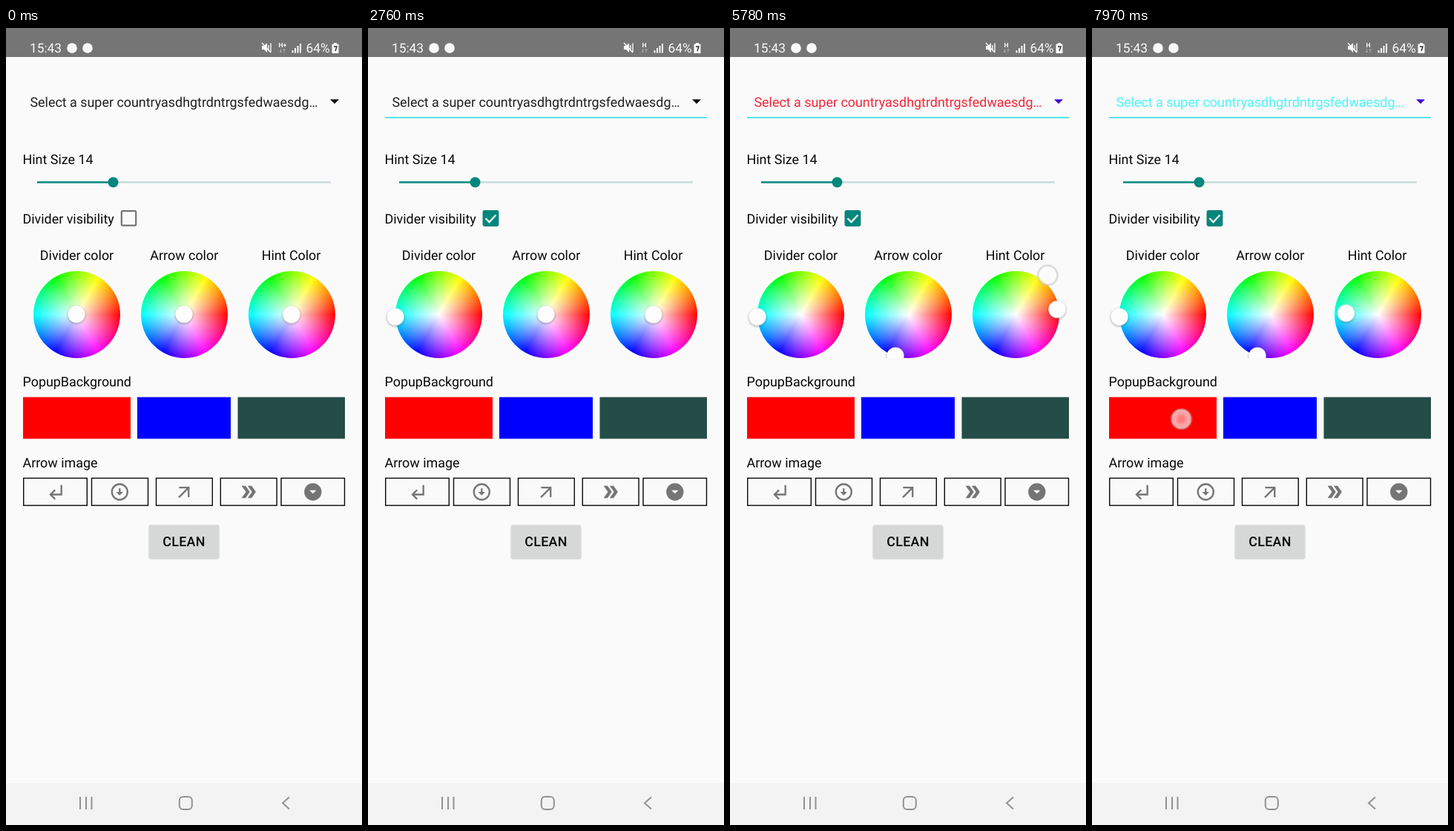
An HTML page for the animation above (8000 ms loop, 480 by 1072 pixels).

```html
<!DOCTYPE html>
<html lang="en">
<head>
<meta charset="utf-8">
<title>Spinner settings demo</title>
<style>
  :root { --bg: #fafafa; --grey: #757575; --teal: #01877c; }
  html, body { margin: 0; width: 100%; height: 100%; overflow: hidden; background: var(--bg); }
  #stage { position: absolute; left: 0; top: 0; width: 480px; height: 1072px; overflow: hidden; background: var(--bg); }
  svg { position: absolute; left: 0; top: 0; }
  .wheel {
    position: absolute; top: 326.5px; width: 117px; height: 117px; border-radius: 50%;
    background:
      radial-gradient(circle closest-side, #fff, rgba(255, 255, 255, 0)),
      conic-gradient(from 90deg, red, magenta, blue, cyan, lime, yellow, red);
  }
  text { font: 17.9px Roboto, sans-serif; fill: #080808; text-rendering: geometricPrecision; }
  .mid { text-anchor: middle; }
  .status text { font-size: 17.3px; fill: var(--bg); }
  .status .tiny { font-size: 8.5px; font-weight: 700; }
  .item { font-size: 20.1px; }
  .button { font-weight: 500; letter-spacing: .3px; }
  .frame rect { fill: none; stroke: #080808; stroke-width: 1.4; }
  .icon { fill: var(--grey); }
  .nav { fill: none; stroke: #929292; stroke-width: 2; }
  .knob { fill: #fdfdfd; filter: drop-shadow(0 1.5px 1.5px rgba(60, 60, 60, .5)); }
  .teal { fill: var(--teal); }

  .anim { animation: 8s linear infinite; }
  #hPlus { animation-name: hPlus; }
  #hOnly { animation-name: hOnly; }
  #checked { animation-name: check; transform-box: fill-box; transform-origin: center; }
  #ripple { animation-name: ripple; transform-box: fill-box; transform-origin: center; }
  #divider { animation-name: divider; }
  #arrow { animation-name: arrow; }
  #hint { animation-name: hint; }
  #knobD { animation-name: knobD; }
  #knobA { animation-name: knobA; }
  #knobH { animation-name: knobH; }
  #popup { animation-name: popup; }
  #touch { animation-name: touchMove, touchShow; }

  @keyframes hPlus { 0%, 8.8% { opacity: 1 } 8.81%, 100% { opacity: 0 } }
  @keyframes hOnly { 0%, 8.8% { opacity: 0 } 8.81%, 100% { opacity: 1 } }
  @keyframes check {
    0%, 6.4% { opacity: 0; transform: scale(.8) }
    8.6%, 100% { opacity: 1; transform: none }
  }
  @keyframes ripple {
    0%, 4.7% { opacity: 0; transform: scale(.4) }
    7% { opacity: .16; transform: none }
    12.6%, 100% { opacity: 0; transform: none }
  }
  @keyframes divider {
    0%, 6.6% { stroke: #8c8c8c; stroke-width: 1px; opacity: 0 }
    6.61%, 20.5% { stroke: #8c8c8c; stroke-width: 1px; opacity: 1 }
    20.6% { stroke: #e6ffff; stroke-width: 1.6px }
    24.5% { stroke: #84f2f6 }
    29%, 100% { stroke: #18e0ea; stroke-width: 1.6px; opacity: 1 }
  }
  @keyframes arrow {
    0%, 38.9% { fill: #080808 }
    39% { fill: #f0e6ff }
    44% { fill: #946cf6 }
    50.5%, 100% { fill: #4203d8 }
  }
  @keyframes hint {
    0%, 61.3% { fill: #202020 }
    61.4% { fill: #ffe4e0 }
    65.5% { fill: #f88c88 }
    69.8%, 72.3% { fill: #f22638 }
    74% { fill: #f4c42c }
    76% { fill: #a4fa50 }
    79.6%, 100% { fill: #4cf4fa }
  }
  @keyframes knobD {
    0%, 20.5% { transform: translate(95px, 385px) }
    24.5% { transform: translate(70px, 386px) }
    29%, 100% { transform: translate(37px, 388.5px) }
  }
  @keyframes knobA {
    0%, 39% { transform: translate(240px, 385px) }
    45% { transform: translate(234px, 411px) }
    50.5%, 100% { transform: translate(223px, 441px) }
  }
  @keyframes knobH {
    0%, 61.3% { transform: translate(384.7px, 385.5px) }
    61.4% { transform: translate(386px, 380px) }
    69.8%, 72.3% { transform: translate(441px, 378.5px) }
    73.6% { transform: translate(425px, 344px) }
    76.2% { transform: translate(385px, 338px) }
    79.6%, 100% { transform: translate(342.5px, 383.5px) }
  }
  @keyframes popup {
    0%, 84.4% { opacity: 0; clip-path: inset(0 0 85% 0) }
    88%, 92% { opacity: 1; clip-path: inset(0) }
    95.5%, 100% { opacity: 0; clip-path: inset(0) }
  }
  @keyframes touchMove {
    0%, 12% { transform: translate(165px, 256px) }
    12.1%, 20% { transform: translate(95px, 385px) }
    23.8% { transform: translate(68px, 386px) }
    28.5%, 35% { transform: translate(34px, 389px) }
    35.1%, 38.4% { transform: translate(240px, 386px) }
    44.3% { transform: translate(234px, 412px) }
    50%, 58% { transform: translate(223px, 442px) }
    58.1%, 60.6% { transform: translate(385.5px, 379px) }
    69%, 70.8% { transform: translate(443px, 378px) }
    72.25% { transform: translate(428.5px, 332.5px) }
    75% { transform: translate(385px, 336px) }
    78.8%, 81% { transform: translate(342px, 383px) }
    81.1%, 90% { transform: translate(250px, 100px) }
    90.1%, 100% { transform: translate(120.5px, 526px) }
  }
  @keyframes touchShow {
    0%, 4.62% { opacity: 0 }
    4.63%, 6.3% { opacity: 1 }
    7.6%, 19.99% { opacity: 0 }
    20%, 30.4% { opacity: 1 }
    32.5%, 37.99% { opacity: 0 }
    38%, 52.5% { opacity: 1 }
    55%, 60.48% { opacity: 0 }
    60.49%, 79.2% { opacity: 1 }
    80.5%, 81.74% { opacity: 0 }
    81.75%, 83.6% { opacity: 1 }
    85%, 99.61% { opacity: 0 }
    99.62%, 100% { opacity: 1 }
  }
</style>
</head>
<body>
<div id="stage">
  <div class="wheel" style="left:37px"></div>
  <div class="wheel" style="left:182px"></div>
  <div class="wheel" style="left:326.5px"></div>

  <svg width="480" height="1072" viewBox="0 0 480 1072">
    <defs>
      <clipPath id="wheelRow"><path d="M0 326.5H480V444H0z"/></clipPath>
      <radialGradient id="touchFill">
        <stop offset=".25" stop-color="#fafafa" stop-opacity=".5"/>
        <stop offset=".7" stop-color="#fdfdfd" stop-opacity=".66"/>
        <stop offset="1" stop-color="#fdfdfd" stop-opacity=".66"/>
      </radialGradient>
    </defs>

    <g class="status">
      <path d="M0 0H480V39H0z" fill="#757575"/>
      <text x="32" y="33">15:43</text>
      <g fill="#fafafa">
        <circle cx="89" cy="27" r="6.8"/>
        <circle cx="110" cy="27" r="6.8"/>
        <path d="M345 24h3l4-4v13l-4-4h-3z"/>
        <path d="M354 23v8M357 20.5v12M345 20l12 13" fill="none" stroke="#fafafa" stroke-width="1.4"/>
        <path d="M385.5 30h2v3.5h-2zM389 27h2v6.5h-2zM392.5 24h2v9.5h-2zM396 21h2v12.5h-2z"/>
        <path d="M442 20h4v1.5h1.500q1 0 1 1v10.500q0 1-1 1h-7q-1 0-1-1v-10.500q0-1 1-1h1.500z"/>
      </g>
      <path d="M442 25h4l-2 6" fill="none" stroke="#303030" stroke-width="1.4"/>
      <text id="hPlus" class="tiny anim" x="367.5" y="26">H+</text>
      <text id="hOnly" class="tiny anim" x="369.5" y="26">H</text>
      <path d="M370.5 28v5m-1.500-2l1.500 2 1.500-2M375 33v-5m-1.500 2l1.500-2 1.500 2" fill="none" stroke="#a8a8a8"/>
      <text x="404.5" y="33">64%</text>
    </g>

    <text id="hint" class="anim" x="32.5" y="105.5">Select a super countryasdhgtrdntrgsfedwaesdg…</text>
    <path id="arrow" class="anim" d="M437 96h12l-6 6z"/>
    <path id="divider" class="anim" d="M23 120.5H457"/>

    <text x="22.5" y="183">Hint Size 14</text>
    <path d="M144 207.5H438" stroke="#c6dcd8" stroke-width="2.4"/>
    <path d="M42 207.5H144" stroke="#01877c" stroke-width="2.6"/>
    <circle class="teal" cx="144.5" cy="207.5" r="7"/>

    <text x="22.5" y="262.5">Divider visibility</text>
    <circle id="ripple" class="teal anim" cx="165.5" cy="256" r="23"/>
    <rect x="155.8" y="246.2" width="19.4" height="19.4" rx="1.5" fill="none" stroke="#757575" stroke-width="2.2"/>
    <g id="checked" class="anim">
      <rect class="teal" x="154.7" y="245.2" width="21.5" height="21.5" rx="2.4"/>
      <path d="M158.5 256l5 5 9-9.5" fill="none" stroke="#fafafa" stroke-width="2.3"/>
    </g>

    <g class="mid">
      <text x="95.5" y="312.3">Divider color</text>
      <text x="240.3" y="312.3">Arrow color</text>
      <text x="384.5" y="312.3">Hint Color</text>
    </g>
    <g clip-path="url(#wheelRow)">
      <circle id="knobD" class="knob anim" r="11.6"/>
      <circle id="knobA" class="knob anim" r="11.6"/>
      <circle id="knobH" class="knob anim" r="11.6"/>
    </g>

    <text x="22.5" y="482">PopupBackground</text>
    <path d="M23 496.5H168V552.5H23z" fill="#f00"/>
    <path d="M177 496.5H303V552.5H177z" fill="#00f"/>
    <path d="M312.5 496.5H457V552.5H312.5z" fill="#244d47"/>

    <text x="22.5" y="590.5">Arrow image</text>
    <g class="frame">
      <rect x="23.7" y="605.5" width="85.6" height="36.7"/>
      <rect x="115.5" y="605.5" width="76" height="36.7"/>
      <rect x="202.5" y="605.5" width="75.8" height="36.7"/>
      <rect x="289.3" y="605.5" width="75.8" height="36.7"/>
      <rect x="371" y="605.5" width="85.5" height="36.7"/>
    </g>
    <g class="icon">
      <path transform="translate(52.5 610) scale(1.167)" d="M11 9l1.420 1.420L8.830 14H18V4h2v12H8.830l3.590 3.580L11 21l-6-6z"/>
      <g transform="translate(139.3 610) scale(1.167)">
        <circle cx="12" cy="12" r="9" fill="none" stroke="#757575" stroke-width="2"/>
        <path d="M11 8v4H8l4 4 4-4h-3V8z"/>
      </g>
      <path transform="translate(226.4 610) scale(1.167)" d="M6 6v2h8.590L5 17.590 6.410 19 16 9.410V18h2V6z"/>
      <path transform="translate(313 610) scale(1.167)" d="M15.5 5H11l5 7-5 7h4.500l5-7zM8.500 5H4l5 7-5 7h4.500l5-7z"/>
      <g transform="translate(399.8 610) scale(1.167)">
        <circle cx="12" cy="12" r="10"/>
        <path d="M8 10h8l-4 4z" fill="#fafafa"/>
      </g>
    </g>

    <rect x="193" y="668.5" width="94" height="44.5" rx="2" fill="#d6d7d7" style="filter:drop-shadow(0 1px 1px rgba(90,90,90,.35))"/>
    <text class="button mid" x="240" y="697">CLEAN</text>

    <path d="M0 1016H480V1072H0z" fill="#f3f3f3"/>
    <g class="nav">
      <path d="M100 1034v17M108 1034v17M115.5 1034v17"/>
      <rect x="233.8" y="1034" width="17" height="17" rx="5"/>
      <path d="M382 1034.5l-9 8 9 8"/>
    </g>

    <g id="popup" class="anim">
      <path d="M0 120H480V288.5H0z" fill="#a9a9a9"/>
      <text class="item" x="8.6" y="156">Standard Text</text>
      <text class="item" x="8.6" y="212">Meeeeeeeeeeeeeeedium Text</text>
      <text class="item" x="8.6" y="268">Very loooooooooooooooooooooooooooooooooo…</text>
    </g>

    <g id="touch" class="anim">
      <circle r="13.6" fill="none" stroke="#c8c8c8" stroke-width="2.5" stroke-opacity=".3"/>
      <circle r="12.8" fill="url(#touchFill)" stroke="#bcbcbc" stroke-width="1.3" stroke-opacity=".7"/>
    </g>
  </svg>
</div>
</body>
</html>
```
